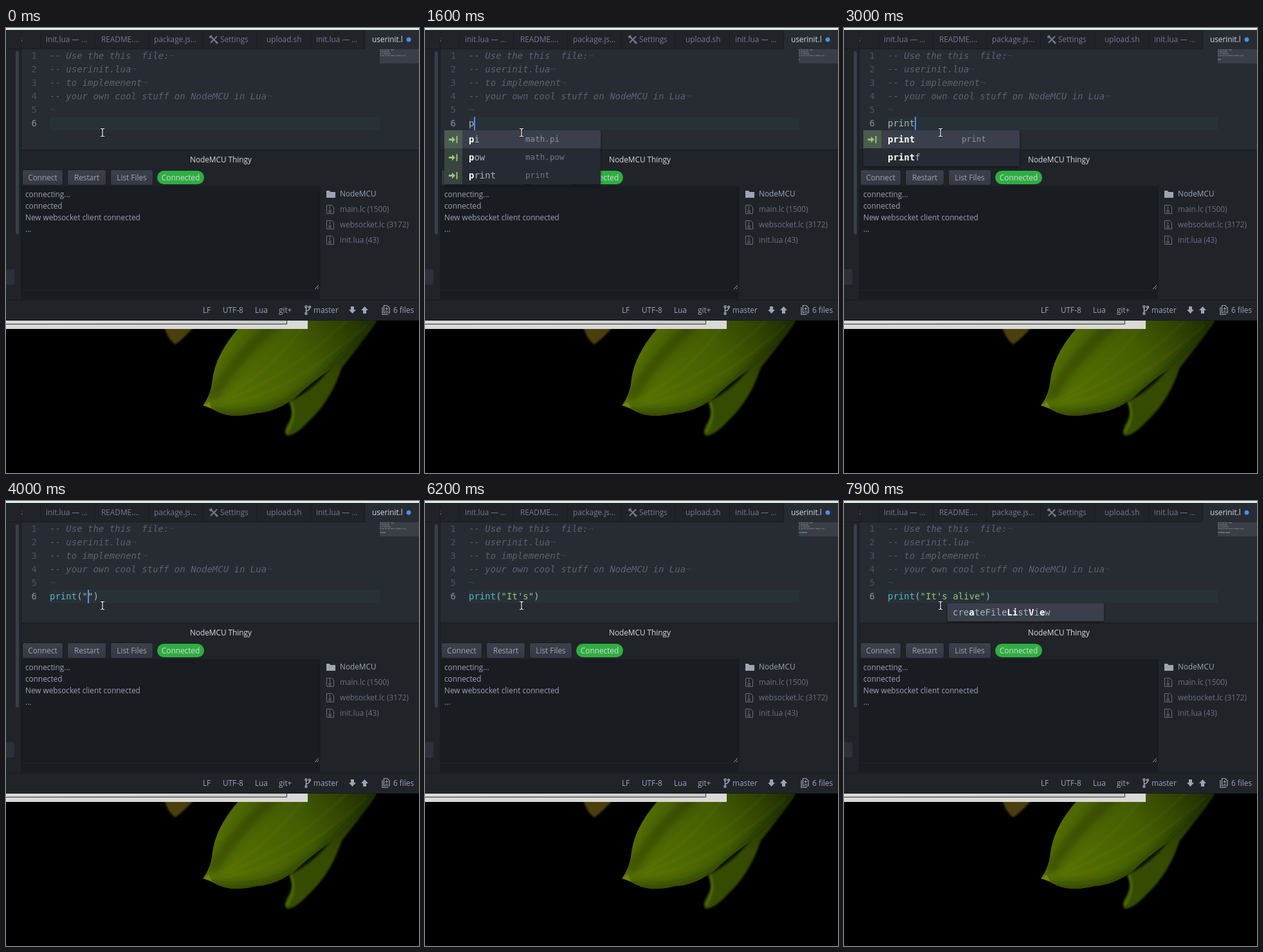
These frames come from a looping animation (642 px wide and 692 px high, 8000 ms). An HTML page:

```html
<!DOCTYPE html>
<html lang="en">
<head>
<meta charset="utf-8">
<style>
  html, body { margin: 0; width: 100%; height: 100%; overflow: hidden; background: #000; }
  svg { display: block; }
  text { white-space: pre; font: 11.8px "Open Sans", "Noto Sans", sans-serif; fill: #9da5b4; }
  .code { font: 14px "DejaVu Sans Mono", monospace; fill: #abb2bf; }
  .comment { font-style: italic; fill: #5c6370; }
  .number { fill: #4b5362; }
  .current { fill: #8b919c; }
  .eol { fill: #3b4048; }
  .hint { font-size: 12.6px; fill: #737a87; }
  .match { font-weight: bold; fill: #fff; }
  .dim { fill: #6b717d; }
  .light { fill: #d7dae0; }
  .tab { fill: #747b88; }
</style>
</head>
<body>
<svg width="642" height="692" viewBox="0 0 642 692">
  <defs>
    <linearGradient id="petal" gradientUnits="userSpaceOnUse" x1="310" y1="590" x2="560" y2="450">
      <stop offset="0" stop-color="#5a7402"/><stop offset=".3" stop-color="#506a02"/>
      <stop offset=".6" stop-color="#455d02"/><stop offset=".8" stop-color="#344802"/>
      <stop offset="1" stop-color="#223001"/>
    </linearGradient>
    <linearGradient id="leaf" gradientUnits="userSpaceOnUse" x1="560" y1="460" x2="440" y2="630">
      <stop offset="0" stop-color="#1e2b01"/><stop offset=".5" stop-color="#354a05"/>
      <stop offset="1" stop-color="#344d03"/>
    </linearGradient>
    <linearGradient id="button" x2="0" y2="1">
      <stop stop-color="#3b404b"/><stop offset="1" stop-color="#343944"/>
    </linearGradient>
    <clipPath id="outline"><use href="#petalShape"/></clipPath>
    <filter id="soft"><feGaussianBlur stdDeviation="1.6"/></filter>
    <filter id="softer"><feGaussianBlur stdDeviation="7"/></filter>
    <filter id="shadow"><feDropShadow dx="0" dy="2" stdDeviation="2" flood-opacity=".45"/></filter>
  </defs>

  <!-- wallpaper -->
  <rect width="642" height="692"/>
  <path d="M245 462Q251 484 263 492Q280 480 294 462Z" fill="#4c400a" filter="url(#soft)"/>
  <g filter="url(#soft)">
    <path d="M578 455Q545 500 522 528Q505 580 470 612Q450 634 436 634Q430 628 440 612Q448 598 440 582Q452 562 490 530Z" fill="url(#leaf)"/>
    <path d="M443 582Q452 606 436 629" fill="none" stroke="#4c6a06" stroke-width="4"/>
    <path d="M443 581Q455 562 508 526Q480 562 448 578Z" fill="#0d1400"/>
  </g>
  <path id="petalShape" d="M306 587Q319 570 321 546Q326 507 362 466L380 450H580Q545 500 505 530Q474 551 448 576Q420 597 389 599Q352 608 329 597Q316 590 306 587Z" fill="url(#petal)"/>
  <g fill="none" clip-path="url(#outline)">
    <path d="M312 600Q400 610 450 578T590 450" stroke="#1a2500" stroke-opacity=".6" stroke-width="16" filter="url(#softer)"/>
    <path d="M318 578Q350 520 420 458" stroke="#243200" stroke-opacity=".5" stroke-width="18" filter="url(#softer)"/>
    <path d="M310 586Q390 560 470 455M312 587Q420 560 530 455M316 588Q430 580 560 462" stroke="#7d9a10" stroke-opacity=".12" stroke-width="3" filter="url(#soft)"/>
  </g>
  <path d="M307 587L315 581L320 591Z" fill="#76811a"/>
  <path d="M0 455H469V468H0Z" fill="#d9d9d7"/>
  <path d="M0 460.5H436.5V455" fill="#c9c9c7" stroke="#333"/>

  <!-- window -->
  <path d="M0 0H642V455H0Z" fill="#202429"/>
  <path d="M0 0H642V3H0Z" fill="#e4f1e6"/>
  <path d="M24 33H642V189H24ZM558 3H642V34H558Z" fill="#272b32"/>
  <path d="M0 32.5H558M0 423.5H642M24 189.5H642M0 454.5H642" stroke="#181a1f"/>
  <path d="M68 138H581V159H68Z" fill="#293138"/>
  <path d="M581 33H642V55H581Z" fill="#3a3e46"/>
  <path d="M24 246H488V407H24ZM24 408H488V422H24Z" fill="#191c20"/>
  <path d="M24 246.5H488V407" fill="none" stroke="#17191d"/>
  <path d="M480 406L486 400M483.500 406L486 403.500" stroke="#a0a5ad"/>
  <circle cx="626" cy="18" r="3.5" fill="#4d8ee8"/>
  <g id="base"></g>

  <!-- sidebar -->
  <path d="M0 4H23V32H0ZM0 33H23V423H0Z" fill="#202429"/>
  <path d="M23.5 3V423" stroke="#181a1f"/>
  <rect x="15" y="36" width="5" height="285" rx="2.5" fill="#383e49"/>
  <path d="M0 375H10Q13 375 13 378V396Q13 399 10 399H0Z" fill="#2c313a"/>

  <!-- icons -->
  <g stroke="#747b88" stroke-width="2" fill="none">
    <path d="M318 23L328 13M319 14L328 23" /><path d="M316.500 15L320 12M326 21L329 24" stroke-width="3"/>
  </g>
  <path d="M498 253H503L504.500 255H512V264H498Z" fill="#9da5b4"/>
  <g id="zips" fill="none" stroke="#6b717d"></g>
  <g fill="none" stroke="#9da5b4" stroke-width="1.5">
    <path d="M466.500 435V443M472 435Q472 439 467 440"/>
    <circle cx="466.500" cy="433.500" r="1.500"/><circle cx="472" cy="434" r="1.500"/><circle cx="466.500" cy="444" r="1.500"/>
    <path d="M585 434V445.500H594M587.500 431.500H592.500L596 435V443H587.500ZM589.500 436.500H594M591.700 434.500V438.500M589.500 440.500H594" stroke-width="1.200"/>
  </g>
  <path d="M536 433H541V438H544L538.500 444L533 438H536ZM555 444H560V439H563L557.500 433L552 439H555Z" fill="#9da5b4"/>

  <g id="live"></g>
  <g fill="none">
    <path id="pointer" d="M147 156.500H149L150 157.500L151 156.500H153M150 157V168M147 168.500H149L150 167.500L151 168.500H153" stroke="#000" stroke-width="3" stroke-opacity=".5"/>
    <path d="M147 156.500H149L150 157.500L151 156.500H153M150 157V168M147 168.500H149L150 167.500L151 168.500H153" stroke="#fff" stroke-width="1.200"/>
  </g>
</svg>

<script>
const $ = id => document.getElementById(id);
const LOOP = 8000, CHAR = 8.43, LEFT = 68, ROW = 28;
const SOURCE = `print("It's alive`;

const text = (x, y, s, cls = "", extra = "") => `<text x="${x}" y="${y}" class="${cls}" ${extra}>${s}</text>`;
const rect = (x, y, w, h, fill, extra = "") =>
  `<rect x="${x}" y="${y}" width="${w}" height="${h}" fill="${fill}" ${extra}/>`;
const centered = 'text-anchor="middle"';

// One pixel per character, spaces left empty
const minimap = (line, row, color) => `<path stroke="${color}" stroke-width="1.500" stroke-opacity=".55" d="${
  [...line].map((c, i) => c === " " ? "" : `M${581 + i} ${34 + row * 3}h1`).join("")}"/>`;

function drawBase() {
  const comments = ["-- Use the this  file:", "-- userinit.lua", "-- to implemenent",
    "-- your own cool stuff on NodeMCU in Lua", ""];
  let out = "";
  for (let i = 1; i <= 6; i++)
    out += text(39.5, 27 + i * 21, i, "code " + (i < 6 ? "number" : "current"));
  comments.forEach((line, i) => {
    out += text(LEFT, 48 + i * 21, line, "code comment")
      + text(LEFT + line.length * CHAR, 48 + i * 21, "¬", "code eol") + minimap(line, i, "#8a909c");
  });

  const tabs = [[20, "s"], [62, "init.lua — …"], [148, "README.…"], [230, "package.js…"],
    [333, "Settings"], [405, "upload.sh"], [482, "init.lua — …"]];
  tabs.forEach(([x, name]) => out += text(x, 22, name, "tab"));
  out += text(569, 22, "userinit.l", "light");
  for (let x = 53; x < 600; x += 84) out += rect(x, 4, 1, 29, "#181a1f");

  out += text(334, 209, "NodeMCU Thingy", "light", centered);
  [[25, 64, "Connect"], [95, 61, "Restart"], [162, 67, "List Files"]].forEach(([x, w, label]) =>
    out += rect(x + .5, 220.5, w - 1, 24, "url(#button)", 'rx="3" stroke="#181a1f"')
      + text(x + w / 2, 237, label, "", centered));
  out += rect(235, 222, 73, 21, "#2fae41", 'rx="10.500"') + text(271.5, 237, "Connected", "light", centered);

  ["connecting...", "connected", "New websocket client connected", "..."].forEach((line, i) =>
    out += text(30, 263 + i * 18, line));
  ["NodeMCU", "main.lc (1500)", "websocket.lc (3172)", "init.lua (43)"].forEach((name, i) =>
    out += text(519, 262 + i * 24, name, i ? "dim" : ""));
  [[306, "LF"], [337, "UTF-8"], [387, "Lua"], [424, "git+"], [478, "master"], [602, "6 files"]].forEach(
    ([x, label]) => out += text(x, 443, label));
  $("base").innerHTML = out;
  $("zips").innerHTML = [276, 300, 324].map(y =>
    `<path d="M498.500 ${y - .5}h8l3 3v10h-11zM503.500 ${y + 1}v5M502 ${y + 7.5}h3v3h-3z"/>`).join("");
}

// Asterisks mark the matched letters
const popups = {
  p: { x: 30, w: 243, hintX: 156, icons: 3, items: ["*p*i", "*p*ow", "*p*rint"],
    hints: ["math.pi", "math.pow", "print"] },
  pri: { x: 30, w: 259, hintX: 229, icons: 1, scroll: true, hints: ["print"],
    items: ["*pri*nt", "*pri*nt", "*pri*ntf", "*Pr*ov*i*des", "*pr*ess*i*ng", "*p*ong*R*ece*i*ved",
      "*P*A*R*T*I*CULAR", "*pr*otectedF*i*les", "*p*a*r*seF*i*leList", "check*P*ong*R*ece*i*ved"] },
  print: { x: 30, w: 243, hintX: 183, icons: 1, items: ["*print*", "*print*f"], hints: ["print"] },
  alive: { x: 161, w: 243, icons: 0, items: ["cre*a*teFile*Li*st*V*i*e*w"], hints: [] },
};

function drawPopup({ x, w, hintX, icons, scroll, items, hints }) {
  const top = 159, height = items.length * ROW;
  let out = rect(x, top, w, height, "#262a32", 'rx="2" filter="url(#shadow)"')
    + rect(x, top, scroll ? w - 10 : w, ROW, "#3a3f4b", 'rx="2"');
  if (scroll) out += rect(x + 252, top + 4, 4, 248, "#454a55", 'rx="2"');
  items.forEach((item, i) => {
    const y = top + i * ROW;
    if (i < icons) out += rect(x, y, ROW, ROW, i ? "#39453f" : "#4c5c50")
      + `<path d="M${x + 7} ${y + 13}h5v-3.500l5 5l-5 5v-3.500h-5zM${x + 18.5} ${y + 9}h2v11h-2z" fill="#98c379"/>`;
    const label = item.replace(/\*(.+?)\*/g, '<tspan class="match">$1</tspan>');
    out += text(x + (icons ? 38 : 8), y + 19, label, "code");
    if (hints[i]) out += text(hintX, y + 18, hints[i], "code hint", i ? "" : 'style="fill:#8b93a1"');
  });
  return out;
}

// [start time, value]
const typing = [[0, 0], [1500, 1], [1800, 2], [1900, 3], [2000, 4], [2200, 5], [3100, 6], [3800, 7], [4800, 9],
  [5800, 11], [6800, 12], [7000, 13], [7100, 14], [7300, 15], [7500, 16], [7600, 17]];
const popupAt = [[0, ""], [1600, "p"], [1900, "pri"], [2200, "print"], [3100, ""], [7600, "alive"]];
const caretAt = [[0, 0], [500, 1], [1000, 0], [1300, 1], [2500, 0], [2900, 1], [3500, 0], [3800, 1], [4200, 0],
  [4600, 1], [5400, 0], [5800, 1], [6200, 0], [6600, 1], [7900, 0]];
const at = (track, t) => track.findLast(([start]) => start <= t)[1];

function drawLive(t) {
  const n = at(typing, t), popup = at(popupAt, t);
  const typed = SOURCE.slice(0, n);
  const line = typed + (n > 6 ? '")' : n > 5 ? ")" : "");
  const parts = n > 5
    ? [["#56b6c2", "print"], ["#abb2bf", "("], ["#98c379", line.slice(6, -1)], ["#abb2bf", ")"]]
    : [["#abb2bf", line]];
  let out = text(LEFT, 153, parts.map(([color, s]) => `<tspan fill="${color}">${s}</tspan>`).join(""), "code");
  let col = 0;
  for (const [color, s] of parts) {
    out += minimap(" ".repeat(col) + s, 5, color);
    col += s.length;
  }
  if (at(caretAt, t)) out += rect(Math.round(LEFT + n * CHAR), 138, 2, 21, "#528bff");
  if (popup) out += drawPopup(popups[popup]);
  return out;
}

let shown;
function tick() {
  const next = drawLive(performance.now() % LOOP);
  if (next !== shown) $("live").innerHTML = shown = next;
  requestAnimationFrame(tick);
}
drawBase();
tick();
</script>
</body>
</html>
```
